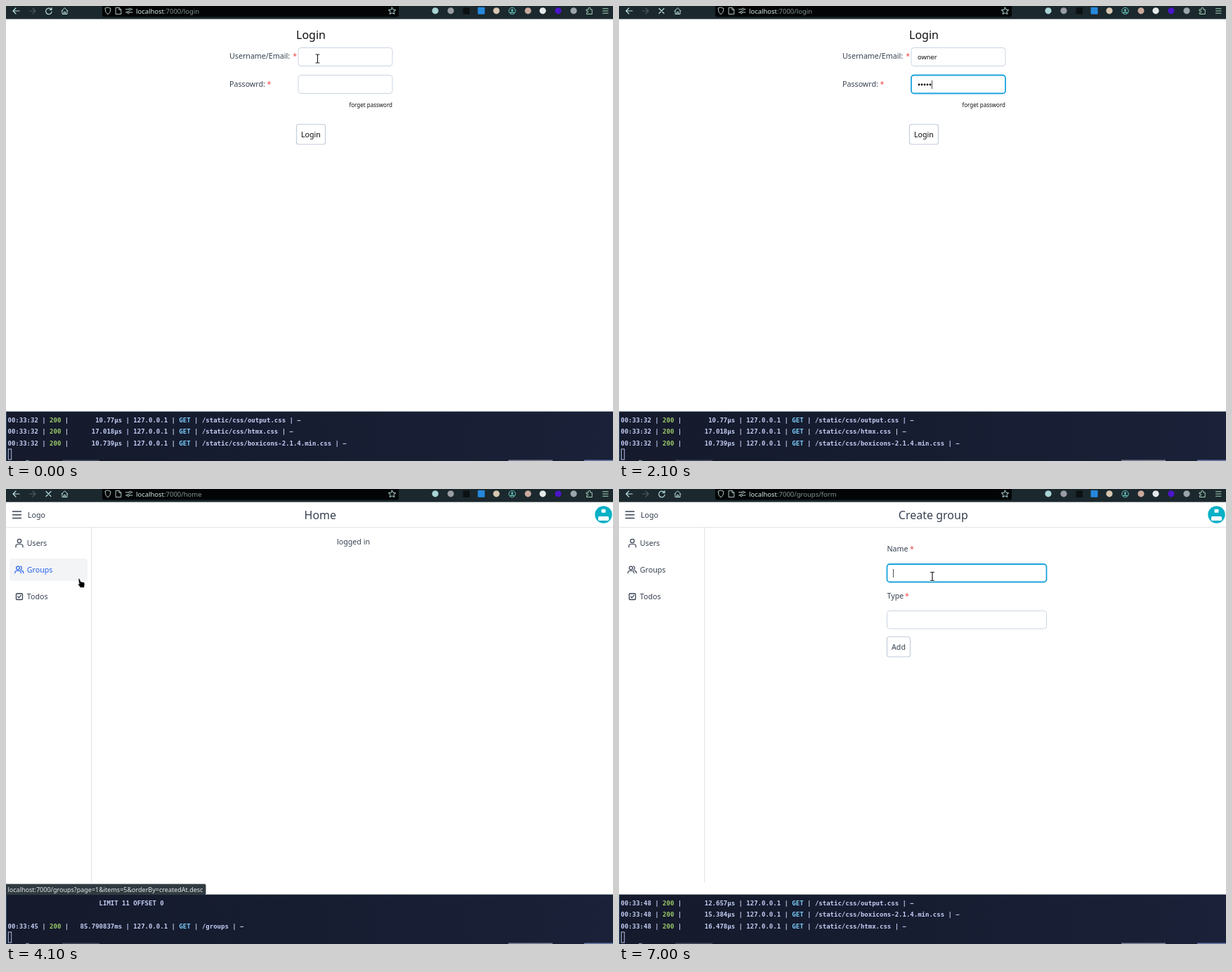
Write an HTML page that moves like this. It is 864 px wide and 648 px high and loops after 8 s.

```html
<!DOCTYPE html>
<html lang="en">
<head>
<meta charset="utf-8">
<title>Group administration demo</title>
<style>
html, body { margin: 0; width: 100%; height: 100%; overflow: hidden; background: #fff; }
svg { display: block; width: 864px; height: 648px; }
text { font-family: "Noto Sans", sans-serif; white-space: pre; }
.mono { font: bold 9px "DejaVu Sans Mono", monospace; }
</style>
</head>
<body>
<svg id="stage" viewBox="0 0 864 648"></svg>
<script>
const stage = document.getElementById('stage');
const LOOP = 8000, STEP = 100;
const INK = '#374151', LINE = '#d1d5db', SLATE = '#cbd5e1', FOCUS = '#1ba4dc', PALE = '#e5e7eb', ICE = '#b9dfe0';
const BASE = 10.67, SMALL = 9.33, TINY = 8;
const LIST = 'groups?page=1&items=5&orderBy=createdAt.desc'.replaceAll('&', '&amp;');

// Drawing helpers
const text = (x, y, size, str, fill = INK, weight = 400, anchor = 'start') =>
  `<text x="${x}" y="${y}" font-size="${size}" fill="${fill}" font-weight="${weight}" text-anchor="${anchor}">${str}</text>`;
const rect = (x, y, w, h, fill, r = 0, stroke = 'none', sw = 1) =>
  `<rect x="${x}" y="${y}" width="${w}" height="${h}" rx="${r}" fill="${fill}" stroke="${stroke}" stroke-width="${sw}"/>`;
const disc = (x, y, r, fill, stroke = 'none', sw = 1) =>
  `<circle cx="${x}" cy="${y}" r="${r}" fill="${fill}" stroke="${stroke}" stroke-width="${sw}"/>`;
const path = (d, stroke, sw = 1, fill = 'none') =>
  `<path d="${d}" stroke="${stroke}" stroke-width="${sw}" fill="${fill}" stroke-linecap="round" stroke-linejoin="round"/>`;
const box = (x, y, w, h, stroke = SLATE, sw = 1, r = 3.5) => rect(x, y, w, h, '#fff', r, stroke, sw);
const input = (x, y, w, h, focused) => box(x, y, w, h, focused ? FOCUS : SLATE, focused ? 1.8 : 1, 4);
const button = (x, y, w, h, label, ink = '#111', border = '#c3cedb') =>
  box(x, y, w, h, border, 1.2, 3) + text(x + w / 2, y + h / 2 + 4, BASE, label, ink, 400, 'middle');
const caret = (x, y) => rect(x, y - 6, 0.8, 12, '#222');
const star = (x, y) => text(x, y, BASE, '*', '#ef4444', 500);
const chevron = (x, y) => path(`M${x - 3} ${y - 1.5}l3 3 3-3`, '#333', 1.1);

// Browser
function toolbar(url, loading) {
  const [host, port] = ['localhost', ':7000/'];
  const reload = loading
    ? path('M57 3.5l7 7M64 3.5l-7 7', ICE, 1.2)
    : path('M64.5 5A4.3 4.3 0 1 0 65.2 8M65 2.5V5.5H62', ICE, 1.2);
  const marks = [[611, '#a9d4d6'], [633, '#9a9da3'], [698, '#d8c7b0'], [743, '#c9a99d'], [764, '#e4e9ea'], [786, '#4b16c9'], [808, '#9ba5aa']];
  return rect(0, 0, 864, 18.6, '#1b282d') + rect(137, -4, 422, 19.5, '#020405', 3) +
    path('M19 7H10M14 3L10 7l4 4', ICE, 1.2) + path('M33 7h9M38 3l4 4-4 4', '#4b5a5f', 1.2) + reload +
    path('M79 7l4.5-4.2L88 7M80 6.5V11.5H87V6.5M82.4 11.5V8.5h2.2v3', ICE) +
    path('M145 2l4 1.5q0 6-4 8.500q-4-2.500-4-8.500z', '#b5c8ca') +
    path('M156.500 2.300h4.500l2.800 2.800v6.500h-7.300zM161 2.300v3h2.800', '#b5c8ca') +
    path('M170.500 4.700h4M178.500 4.700h1.500M170.500 9h1.500M176 9h4', '#b5c8ca') +
    disc(176.5, 4.7, 1.5, 'none', '#b5c8ca') + disc(174, 9, 1.5, 'none', '#b5c8ca') +
    text(185, 10.7, 9.47, `${host}<tspan fill="#879496">${port}${url}</tspan>`, '#dcebec') +
    path('M549.500 2l1.500 3.300 3.600.4-2.700 2.400.8 3.500-3.200-1.800-3.200 1.800.8-3.500-2.700-2.400 3.600-.4z', ICE) +
    marks.map(([x, c]) => disc(x, 6.8, 4.6, c)).join('') +
    rect(650.5, 2.3, 9.5, 9.5, '#0c1114') + rect(671.5, 1.8, 10, 10, '#2688dd', 1) +
    disc(720.5, 7, 4.7, 'none', '#67c5bd') + disc(720.5, 5.8, 1.6, '#67c5bd') + path('M717.800 10q2.700-2.500 5.400 0', '#67c5bd', 1.4) +
    path('M826.500 5h2.500V3.500a1.400 1.400 0 0 1 2.800 0V5h2.400v6.500h-7.700V9.300h1.200a1.100 1.100 0 0 0 0-2.200h-1.200z', '#a4d3b8') +
    path('M849.500 3.700h7.500M849.500 7h7.500M849.500 10.300h7.500', '#a4d3b8', 1.1);
}

function statusBar(url, width, opacity) {
  return `<g opacity="${opacity}">${rect(-2, 562.5, width + 2, 15.5, '#303a40', 2)}${text(2.5, 574, 9, 'localhost:7000/' + url, '#e4e9ea')}</g>`;
}

// Terminal
const css = name => `/static/css/${name}.css`;
const [OUT, HTMX, ICONS] = ['output', 'htmx', 'boxicons-2.1.4.min'].map(css);
const log = (time, span, route) =>
  `00:33:${time} | <tspan fill="#9ece6a">200</tspan> | ${span.padStart(13)} | 127.0.0.1 | <tspan fill="#7dcfff">GET</tspan> | ${route} | −`;
const logs = (time, rows) => rows.map(([span, route]) => log(time, span, route));
const LOGS = [
  [0, logs(32, [['10.77µs', OUT], ['17.018µs', HTMX], ['10.739µs', ICONS]])],
  [2300, logs(44, [['15.455µs', HTMX], ['17.04µs', OUT], ['14.901µs', ICONS]])],
  [4000, [' '.repeat(24) + 'LIMIT 11 OFFSET 0', '', log(45, '85.790837ms', '/groups')]],
  [4500, logs(46, [['12.1µs', OUT], ['11.365µs', ICONS], ['11.607µs', HTMX]])],
  [6700, logs(48, [['12.657µs', OUT], ['15.384µs', ICONS], ['16.478µs', HTMX]])]
];
function terminal(t) {
  const lines = LOGS.filter(([at]) => at <= t).pop()[1];
  return rect(0, 577, 864, 71, 'url(#night)') + rect(0, 577.5, 864, 1, '#10202f') + rect(0, 578, 1, 70, '#294d70') +
    lines.map((s, i) => `<text class="mono" x="2.5" y="${593.2 + 16.2 * i}" fill="#c5cff5">${s}</text>`).join('') +
    rect(3.3, 631, 4.4, 15, 'none', 0, '#c5cff5', 0.9) +
    rect(28, 646.8, 5, 1.2, '#8189a5') + rect(80, 646.5, 53, 1.5, '#474b62') +
    rect(715, 646.5, 63, 1.5, '#82849a') + rect(823, 646.5, 41, 1.5, '#6d7fae');
}

// Pages
function loginPage(t) {
  const nameFocus = t >= 100 && t < 1000, passFocus = t >= 1000;
  const name = 'owner'.slice(0, t < 600 ? 0 : t < 700 ? 1 : t < 800 ? 4 : 5);
  const dots = t < 1600 ? 0 : Math.min(5, 1 + (t - 1600) / STEP);
  let out = text(434, 47.4, 16, 'Login', '#111', 400, 'middle') +
    text(318, 75.2, BASE, 'Username/Email:', INK, 500) + star(408.3, 75.2) +
    text(318, 114.5, BASE, 'Passowrd:', INK, 500) + star(371.5, 114.5) +
    input(416, 59.5, 134, 26, nameFocus) + input(416, 98.5, 134, 26, passFocus) +
    text(425, 76.2, SMALL, name, '#111') +
    text(550, 144, TINY, 'forget password', '#111', 400, 'end') + button(413.5, 168.5, 41, 28.5, 'Login');
  for (let i = 0; i < dots; i++) out += disc(427 + 4 * i, 112, 1.4, '#111');
  if (t >= 200 && t < 1000) out += caret(425 + 5.58 * name.length, 72.500);
  if (t >= 1200) out += caret(425 + 4 * dots, 112);
  if (t >= 600 && t < 800) out += rect(416, 87, 134, 87, '#1b282d', 3) + text(425, 102, SMALL, 'owner', '#dcebec');
  return out;
}

function frame(title, hover) {
  const blue = '#2563eb', g = hover ? blue : INK;
  const person = (x, y, c) => disc(x, y - 3, 2.7, 'none', c, 1.2) + path(`M${x - 5} ${y + 6}v-1.500q0-3 3-3h4q3 0 3 3v1.500`, c, 1.2);
  return path('M9.500 32h12M9.500 36.800h12M9.500 41.600h12', INK, 1.5) + text(31, 40.8, BASE, 'Logo') +
    text(447.3, 43.3, 16, title, INK, 400, 'middle') +
    disc(850.5, 36.5, 12.2, '#08b0c6') + rect(847.5, 28.8, 6, 5, '#fff', 1) + rect(843, 39, 15, 6, '#fff', 1.5) +
    rect(0, 54.3, 864, 1, '#dfe2e6') + rect(121.3, 55, 1, 506, '#dfe2e6') +
    (hover ? rect(5, 99, 111, 32, '#f3f4f6', 4) : '') +
    person(19, 77, INK) + text(29.8, 81, BASE, 'Users') +
    disc(17, 112.5, 2.400, 'none', g, 1.2) + path('M12.700 119.800q0-3.300 2.800-3.300h3q2.800 0 2.800 3.300M20.500 110a2.600 2.600 0 0 1 0 5M22 116q2.800.8 2.800 3.800', g, 1.2) +
    text(29.8, 119, BASE, 'Groups', g) +
    rect(14.5, 149, 9, 8.5, 'none', 1, INK, 1.3) + path('M16.800 153.200l1.500 1.700 3-3.500', INK, 1.3) + text(29.8, 157, BASE, 'Todos');
}

function groupsPage() {
  const check = (x, y) => box(x, y, 13, 13, LINE, 1, 2.5);
  const cell = (x, y, s, weight) => text(x, y, SMALL, s, '#111', weight, 'middle');
  const pager = (x, w) => box(x, 164.5, w, 20.5, '#f0f1f3', 1, 3);
  return button(139, 72.5, 35, 28.5, 'New') + button(180.500, 72.5, 45.5, 28.5, 'Delete', '#f6b0b0', '#f8d3d3') +
    button(801.5, 72.5, 50, 28.5, 'Update', INK) +
    box(416.5, 72.5, 194, 28, LINE, 1, 4) + text(425, 90, SMALL, 'Search by name', '#6b7280') +
    disc(597, 86, 3.3, 'none', '#6b7280', 1.1) + path('M599.600 88.600l2.400 2.400', '#6b7280', 1.2) +
    box(139, 107, 712.5, 84, PALE, 1, 4) + rect(139, 132, 712, 1, PALE) + rect(139, 157.7, 712, 1, PALE) +
    check(192.300, 113.5) + check(192.3, 139) + check(740.3, 139) +
    cell(359.5, 123.5, 'name', 700) + cell(551, 123.5, 'type', 700) + cell(746.7, 123.5, 'disabled', 700) +
    cell(359.5, 149.3, 'owner', 500) + cell(551, 149.3, 'owner', 500) +
    text(149.8, 178, TINY, 'items / page:', '#111', 500) + pager(203, 24.5) + text(206, 178.5, SMALL, '5', '#111') + chevron(215.3, 175) +
    pager(457.5, 20.5) + pager(479, 31) + pager(511.5, 20.5) +
    path('M468.800 172l-2.500 2.800 2.500 2.800M520.500 172l2.500 2.800-2.500 2.800', '#222', 1.3) +
    text(485, 178.5, SMALL, '1', '#111') + chevron(497.5, 175) +
    text(840.5, 178, TINY, 'total records:1', '#111', 500, 'end');
}

function formPage(t) {
  return text(381.5, 89.2, BASE, 'Name', INK, 500) + star(414, 89.2) + input(381.5, 107, 227, 25.5, t >= 6900) +
    text(381.5, 155.700, BASE, 'Type', INK, 500) + star(407, 155.7) + input(381.5, 173.5, 227, 25.5) +
    button(381.5, 210.5, 33, 28.5, 'Add', INK) + (t >= 7000 ? caret(390, 120) : '');
}

// Pointer: time, x, y
const ROUTE = [[0, 443.5, 75], [600, 443.5, 75], [2200, 444, 73], [2600, 444, 73], [2700, 426, 76], [2900, 260, 98], [3100, 106, 120],
  [3300, 103, 128], [4200, 103, 128], [4700, 225, 136], [5000, 240, 139], [5400, 152, 83], [5600, 152, 83],
  [5800, 239, 141], [6000, 248, 150], [6300, 320, 150], [6800, 446, 124.500], [8000, 446, 124.500]];
function pointer(t) {
  if (t >= 600 && t < 2200) return '';
  const i = ROUTE.findIndex(([at]) => at > t), [a, x0, y0] = ROUTE[i - 1], [b, x1, y1] = ROUTE[i];
  const k = (t - a) / (b - a), x = x0 + (x1 - x0) * k, y = y0 + (y1 - y0) * k;
  const beam = t < 600 || t >= 6800, hand = t >= 3100 && t < 4300 || t >= 5400 && t < 5700;
  const shape = beam
    ? path('M-2.500-6h1.700L0-5.500.800-6H2.500M0-5.500V5.500M-2.500 6h1.700L0 5.500.800 6H2.500', '#fff', 2.6) +
      path('M-2.500-6h1.700L0-5.500.800-6H2.500M0-5.500V5.500M-2.500 6h1.700L0 5.500.800 6H2.500', '#222', 1.2)
    : hand
      ? path('M0 0q1.200-1.200 2 .5L3.500 4l4 .8q1.800.6 1.500 3.200l-.8 4.500H3L-.5 8q0-1.500 1.500-.8z', '#fff', 0.6, '#000')
      : path('M0 0V11.500L2.700 9.200 4.600 13.500 6.500 12.600 4.600 8.600H8Z', '#fff', 0.7, '#000');
  return `<g transform="translate(${x} ${y})">${shape}</g>`;
}

const DEFS = '<defs><linearGradient id="night"><stop stop-color="#151a2c"/><stop offset=".5" stop-color="#171d31"/><stop offset="1" stop-color="#1a2138"/></linearGradient></defs>';
const between = (t, a, b) => t >= a && t < b;

function scene(t) {
  const page = t < 2200 ? loginPage(t)
    : t < 4400 ? frame('Home', t >= 3100) + text(471, 78.6, BASE, 'logged in')
    : t < 6600 ? frame('Groups') + groupsPage()
    : frame('Create group') + formPage(t);
  const url = t < 2200 ? 'login' : t < 4400 ? 'home' : t < 6600 ? LIST : 'groups/form';
  const loading = between(t, 2000, 2300) || between(t, 3500, 4600) || between(t, 5700, 6900);
  return DEFS + terminal(t) + rect(0, 0, 864, 577.5, '#fff') + page + toolbar(url, loading) +
    (between(t, 3300, 4400) ? statusBar(LIST, 284.5, 1) : '') +
    (between(t, 5600, 6100) ? statusBar('groups/form', 124.5, t < 6000 ? 1 : 0.4) : '') + pointer(t);
}

let last = -1;
function tick(now) {
  const t = Math.floor(now % LOOP / STEP) * STEP;
  if (t !== last) stage.innerHTML = scene(last = t);
  requestAnimationFrame(tick);
}
tick(performance.now());
</script>
</body>
</html>
```
